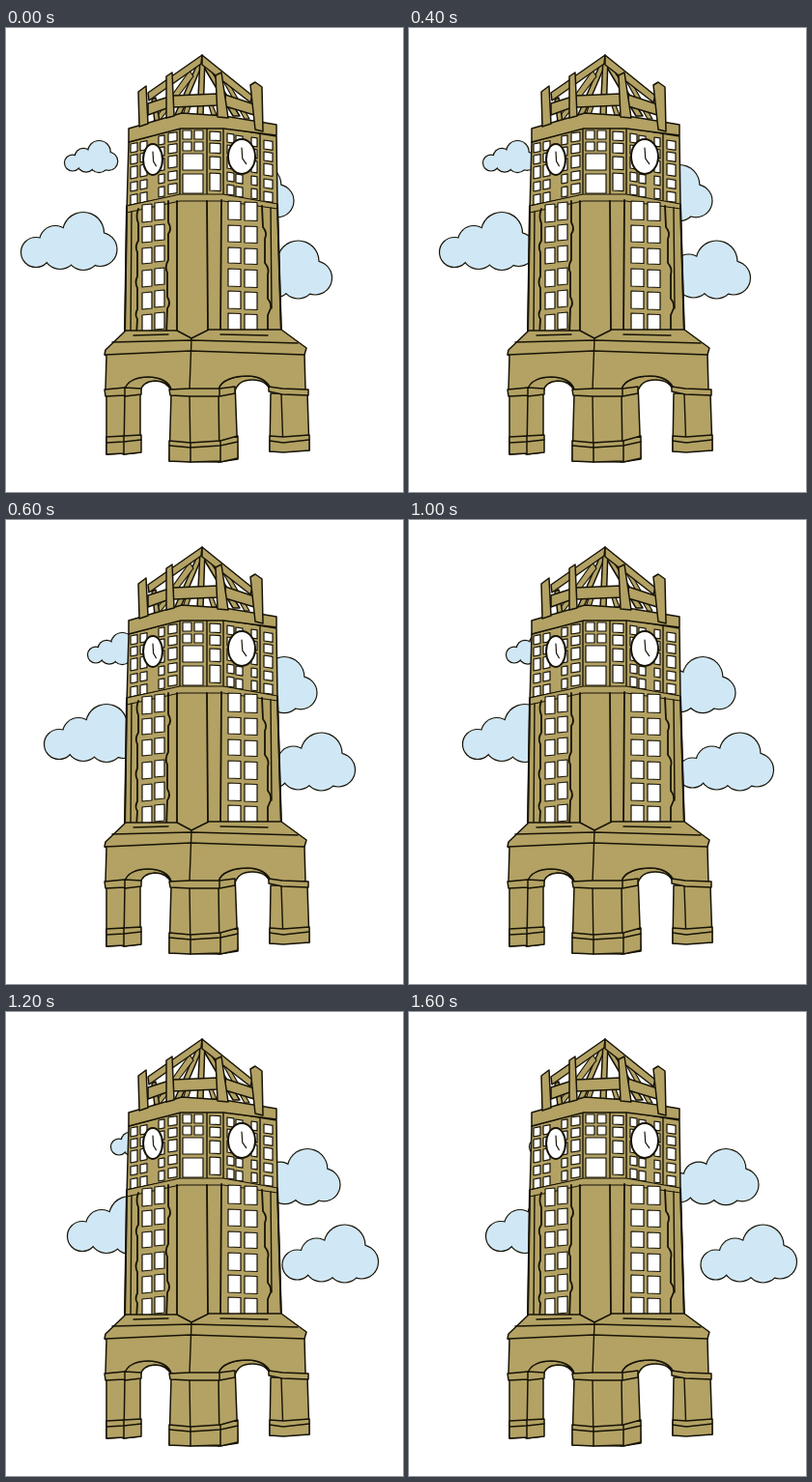
Write an HTML page with a canvas that moves like this. It is 411 by 480 pixels and loops after 1800 ms.

```html
<!DOCTYPE html>
<html lang="en">
<head>
<meta charset="utf-8">
<title>Clock tower</title>
<style>
html, body { margin: 0; width: 100%; height: 100%; overflow: hidden; background: #fff; }
canvas { display: block; }
</style>
</head>
<body>
<canvas id="stage" width="411" height="480"></canvas>
<script>
const ctx = document.getElementById('stage').getContext('2d');
const STONE = '#b3a264', INK = '#171306', SKY = '#d0e7f5';
const STEP_MS = 200, STEPS = 9, STEP_PX = 8;

function shape(d, fill = STONE, width = 1.5) {
  const path = new Path2D(d);
  if (fill) {
    ctx.fillStyle = fill;
    ctx.fill(path);
  }
  ctx.strokeStyle = INK;
  ctx.lineWidth = width;
  ctx.stroke(path);
}

const line = (d, width = 1.4) => shape(d, null, width);

// slope is the drop of the top and bottom edges per pixel across
function pane(x, y, w, h, slope = 0) {
  const dy = w * slope;
  shape(`M${x} ${y}l${w} ${dy}v${h}l${-w} ${-dy}z`, '#fff', 1.2);
}

// lobes: x, y, radius inside a 101 by 61 box
const LOBES = [[16, 42, 16], [36, 31, 17], [65, 22, 22], [82.5, 39, 18], [65, 43, 18], [41, 42, 18]];

function cloud(x, y, scale) {
  for (const [color, grow] of [[INK, 0.1], [SKY, -1.1]]) {
    ctx.fillStyle = color;
    for (const [cx, cy, r] of LOBES) {
      ctx.beginPath();
      ctx.arc(x + cx * scale, y + cy * scale, r * scale + grow, 0, Math.PI * 2);
      ctx.fill();
    }
  }
}

function roof() {
  shape('M199 35l-25 57h6l23-54z');
  shape('M206 34l36 57h-7l-31-52z');
  shape('M201 31l-3 60h6l2-60z');
  shape('M190 44l-37 52h6l35-46z', STONE, 1.2);
  shape('M222 50l25 44h5l-23-40z', STONE, 1.2);
  shape('M151 74l3 23h5l-4-25z');
  shape('M186 81l-3 9h5l3-9zM210 80l3 10h5l-4-10z', STONE, 1.2);
  shape('M203 28L147 67l1 8 54-38z');
  shape('M203 28l52 42-2 7-50-39z');
  shape('M147 78l25-8v11l-25 9z');
  shape('M173 70l46-2 1 12-47 2z');
  shape('M227 69l30 10v11l-30-9z');
}

function posts() {
  shape('M137 66l8-6 2 39-9 3z');
  shape('M166 50l6-4 2 45-8 2z');
  shape('M217 49l6-3 7 47-11-1z');
  shape('M253 59l5-3 7 5 1 46-8-2z');
}

function clock(x, y, rx, ry) {
  ctx.beginPath();
  ctx.ellipse(x, y, rx, ry, 0, 0, Math.PI * 2);
  ctx.fillStyle = '#fff';
  ctx.fill();
  ctx.strokeStyle = INK;
  ctx.lineWidth = 2;
  ctx.stroke();
  line(`M${x} ${y - ry * 0.5}l${rx * 0.06} ${ry * 0.62} ${rx * 0.28} ${ry * 0.3}`, 1.2);
}

function clockStage() {
  shape('M127 118L181 103H225L280 112L281 184L225 174H180L125 190z');
  const rows = [[107, 9], [119, 9], [131, 12], [147, 9], [160, 10]];
  for (const [y, h] of rows) {
    pane(129, y + 13, 7, h, -0.2);
    pane(139, y + 11, 7, h, -0.2);
    pane(158, y + 5, 6, h, -0.2);
    pane(168, y + 2, 9, h, -0.15);
    pane(229, y + 2, 7, h, 0.15);
    pane(238, y + 4, 7, h, 0.15);
    pane(254, y + 6, 6, h, 0.15);
    pane(267, y + 9, 9, h, 0.15);
  }
  for (const y of [106, 118]) {
    pane(183, y, 9, 9);
    pane(195, y, 9, 9);
  }
  pane(183, 130, 21, 17);
  pane(183, 151, 21, 20);
  for (const [y, h] of [[107, 9], [119, 10], [133, 13], [150, 18]]) pane(211, y, 11, h, 0.05);
  line('M180 103v71M208 103v71M225 103v71M263 109v70');
  shape('M127 104L182 88L226 91L280 100V111L225 104H181L127 118z');
  clock(152, 136, 10, 16);
  clock(244, 133, 14, 18);
}

function shaft() {
  shape('M125 184L180 173H225L281 183L285 318L192 325L123 318z');
  shape('M125 184L180 172H225L281 182V187L225 179H180L125 191z', STONE, 1.2);
  const leftRows = [[183, 18], [206, 16], [228, 16], [251, 17], [274, 17], [297, 17]];
  for (const [y, h] of leftRows) {
    pane(141, y, 10, h, -0.1);
    pane(154, y - 2, 10, h, -0.1);
  }
  const rightRows = [[179, 19], [204, 17], [227, 16], [249, 18], [272, 18], [295, 18]];
  for (const [y, h] of rightRows) {
    pane(230, y, 13, h, 0.04);
    pane(247, y + 1, 13, h, 0.04);
  }
  line('M137 187q-3 8 0 15v18q-4 6-1 12v25q-3 6 0 12v22q-3 6 0 10l-1 17', 1.8);
  line('M168 179v22q4 7 0 12v27q-4 7-1 13v25q4 7 0 12l-1 28', 1.8);
  line('M177 179v134M208 179l1 133M223 178l-1 138', 1.8);
  line('M265 184l1 22q5 6 2 12v25q5 6 3 12v25q4 5 3 10l-3 7v21', 1.8);
  line('M130 190l-1 127M274 186l1 104');
  line('M125 185l-2 133M281 183l4 135', 2);
}

function base() {
  // deep sides of the arches sit behind the front wall
  shape('M122 370L139 366V439L121 441z');
  shape('M219 370L237 366L240 446L220 449z');
  // undersides of the arches
  shape('M122 374C125 364 136 361 147 361C160 361 169 366 171 376Q167 365 154 365Q141 366 139 376z');
  shape('M220 374C222 364 237 360 250 360C263 360 272 366 274 376Q270 364 255 364Q240 364 237 376z');
  shape('M124 313L103 333L102 338L104 339L103 374L123 374C125 365 136 361 147 361C160 361 169 366 171 374H220C222 364 237 360 250 360C263 360 272 366 274 374H310L309 338L311 331L285 312L210 312L192 321L177 313z');
  line('M132 318l36-1M222 317l49 1');
  line('M110 325l82-2 110 3M103 338l88-4 118 4');
  line('M192 321l-2 53');

  shape('M104 378h19l-1 62-18 1z');
  shape('M171 378h49l1 71-52-1z');
  shape('M274 378h38l2 59-41 1z');
  line('M190 378l1 71M285 379l2 58');

  shape('M102 374l21-2v8l-20 1zM123 372l17 1v6l-17 2z');
  shape('M169 374l21-1h31v8h-31l-20-1zM221 373l16-2v7l-16 3z');
  shape('M272 371l14 2 27 1v6l-27-1-14-3z');
  shape('M104 423l18-1v18l-18 1zM122 422l18-1v18l-18 2z');
  shape('M169 427l22 2v20l-22-1zM191 429l31-2v21l-31 1zM222 427l18-5v23l-18 4z');
  shape('M273 422l14 1 27-2v16l-27 2-14-1z');
  line('M104 429l18-1 18-2M169 432l22 2 31-2 18-4M273 427l14 2 27-3');
}

function draw(step) {
  const shift = step * STEP_PX;
  ctx.fillStyle = '#fff';
  ctx.fillRect(0, 0, 411, 480);
  cloud(60 + shift, 116, 0.56);
  cloud(15 + shift, 190, 1);
  cloud(201 + shift, 141, 0.97);
  cloud(237.5 + shift, 219.5, 1);
  roof();
  clockStage();
  posts();
  shaft();
  base();
}

ctx.lineJoin = ctx.lineCap = 'round';
let start = null, shown = -1;

function tick(now) {
  start ??= now;
  const step = Math.floor((now - start) / STEP_MS) % STEPS;
  if (step !== shown) draw(shown = step);
  requestAnimationFrame(tick);
}

draw(0);
requestAnimationFrame(tick);
</script>
</body>
</html>
```
